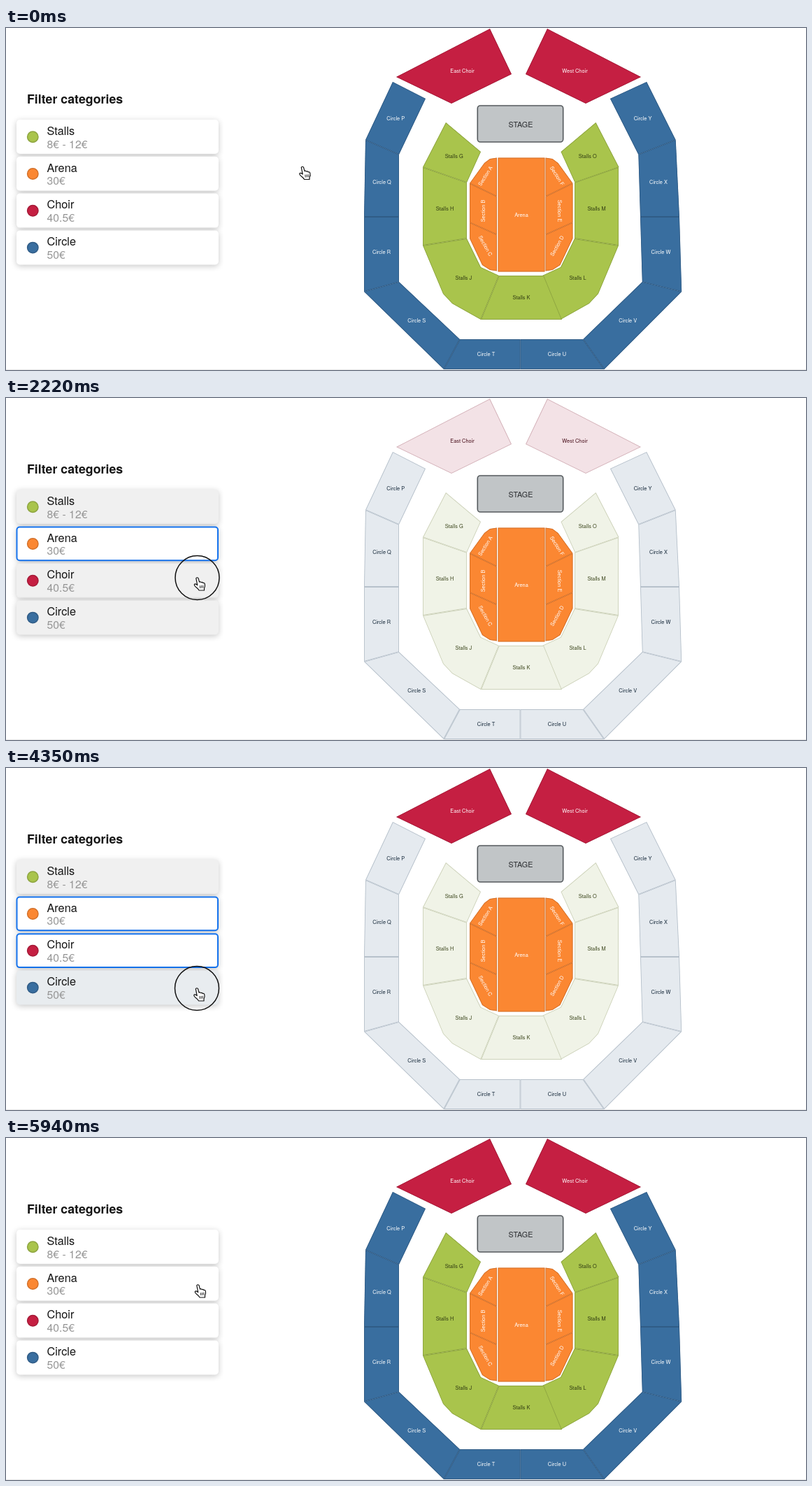
Recreate the animation shown at these times as an HTML page with a canvas. Size 1144 by 489 pixels, loop 7 s.

```html
<!DOCTYPE html>
<html lang="en">
<head>
<meta charset="utf-8">
<title>Filter categories</title>
<style>
html, body { margin: 0; width: 100%; height: 100%; overflow: hidden; background: #fff; }
canvas { display: block; width: 1144px; height: 489px; }
</style>
</head>
<body>
<canvas id="stage"></canvas>
<script>
const W = 1144, H = 489, LOOP = 7000;
const PRESS = 120, LAG = 60, FADE = 30;
const FONT = '"Helvetica Neue", Helvetica, "Liberation Sans", Arial, sans-serif';
const canvas = document.getElementById('stage');
const ctx = canvas.getContext('2d');
const ratio = window.devicePixelRatio || 1;
canvas.width = W * ratio;
canvas.height = H * ratio;

const rgb = c => `rgb(${c.map(Math.round)})`;
const toward = (c, grey, p) => rgb(c.map(v => v + (grey - v) * p));

function category(name, price, color, text) {
  return {
    name, price,
    normal: { fill: rgb(color), line: toward(color, 0, 0.16), text },
    dim: { fill: toward(color, 248, 0.9), line: toward(color, 214, 0.8), text: toward(color, 0, 0.65) }
  };
}
const cats = [
  category('Stalls', '8€ - 12€', [169, 196, 76], '#2f3a12'),
  category('Arena', '30€', [251, 135, 50], '#fff'),
  category('Choir', '40.5€', [197, 31, 66], '#fff'),
  category('Circle', '50€', [57, 110, 159], '#fff')
];
const [stalls, arena, choir, circle] = cats;

// Pointer trips; each press switches its category on or off
const home = { x: 424, y: 198.5 };
const trips = [
  { from: 90, to: 990, x: 273.5, y: 207, press: 1260, cat: arena },
  { from: 1500, to: 2100, x: 273.5, y: 257, press: 2190, cat: choir },
  { from: 2500, to: 2920, x: 273, y: 315, press: 3000, cat: circle },
  { from: 2920, to: 4200, x: 273, y: 315, press: 4260, cat: circle },
  { from: 4560, to: 4700, x: 274, y: 262, press: 4710, cat: choir },
  { from: 4830, to: 5000, x: 275, y: 228, press: 5000, cat: arena },
  { from: 5160, to: 5520, x: 274.5, y: 210 }
];

const blocks = [];
const mean = (points, k) => points.reduce((sum, p) => sum + p[k], 0) / points.length;

// A label sits at the mean of its corners unless told otherwise
function add(cat, label, points, at = [mean(points, 0), mean(points, 1)], turn = 0) {
  const path = new Path2D();
  points.forEach(([x, y]) => path.lineTo(x, y));
  path.closePath();
  blocks.push({ cat, label, at, path, turn });
}

// sum: left x plus right x; tilt: how that sum grows downwards
const flip = (sum, tilt = 0) => ([x, y]) => [sum - x + tilt * (y - 270), y];

function addPair(cat, labels, points, sum, at, turn = 0) {
  const mirror = flip(sum);
  add(cat, labels[0], points, at, turn);
  add(cat, labels[1], points.map(mirror), at && mirror(at), -turn);
}

// Outer ring: left halves mirrored, then cut along the spokes
const wrap = (half, middle, sum) => [...half, middle, ...half.map(flip(sum, 0.03)).reverse()];
const outer = wrap([[553, 77], [514, 160], [512, 270], [512, 377], [626, 488]], [735.5, 488], 1475);
const inner = wrap([[600, 101], [562, 181], [562, 270], [562, 363], [649, 445]], [735.5, 445], 1469);
[...'PQRSTUVWXY'].forEach((letter, i) =>
  add(circle, 'Circle ' + letter, [outer[i], outer[i + 1], inner[i + 1], inner[i]]));

addPair(stalls, ['Stalls G', 'Stalls O'], [[629, 135], [679, 177], [659, 221], [596, 199]], 1472.5);
addPair(stalls, ['Stalls H', 'Stalls M'], [[596, 199], [659, 221], [659, 301], [596, 311]], 1472);
addPair(stalls, ['Stalls J', 'Stalls L'], [[596, 311], [659, 301], [679, 342], [705, 354],
  [679, 417], [638, 394], [625, 380]], 1472);
add(stalls, 'Stalls K', [[679, 417], [705, 354], [769, 354], [795, 417]]);

addPair(choir, ['East Choir', 'West Choir'], [[692, 1], [723, 66], [637, 108], [558, 70]], 1466);

add(arena, 'Arena', [[703.5, 185.5], [770.5, 185.5], [770.5, 348.5], [703.5, 348.5]]);
const wings = [
  [[663, 222], [684, 193], [692, 187], [702, 185.5], [702, 241]],
  [[663, 222], [702, 241], [702, 295.5], [663, 278]],
  [[663, 278], [702, 295.5], [702, 347.5], [692, 346], [681, 339], [663, 301]]
];
wings.forEach((wing, i) => addPair(arena, ['Section ' + 'ABC'[i], 'Section ' + 'FED'[i]], wing, 1473.5,
  [i === 1 ? 682 : 685.5, 211.5 + i * 50], [-58, -90, 61][i]));

const hand = new Path2D('M-1.7 .8Q-.2-1.2 1.5.6L3 6.2Q4.6 5 5.6 6.7Q7.2 5.8 8.2 7.5' +
  'Q10.2 6.7 10.8 8.9Q11.6 12 10 15.3L10 18L2.6 18Q1.2 15.4-2.3 12.9Q-5.2 10.2-3.7 9.1' +
  'Q-2 8.3.2 10.6Z');
const creases = new Path2D('M3.8 11.2L4.3 15M6 11L6.4 14.8M8.2 10.8L8.4 14.6');

const picked = (cat, t) =>
  trips.filter(s => s.cat === cat && s.press + LAG <= t).length % 2 === 1;
const filtering = t => cats.some(c => picked(c, t));

// Mean of recent states gives a short cross-fade
function dimLevel(cat, t) {
  let sum = 0;
  for (let i = 0; i < 4; i++) {
    const past = t - i * FADE / 4;
    sum += filtering(past) && !picked(cat, past);
  }
  return sum / 4;
}

function fingertip(t) {
  let { x, y } = home;
  for (const trip of trips) {
    const p = Math.min(1, Math.max(0, (t - trip.from) / (trip.to - trip.from)));
    const e = p * p * (3 - 2 * p);
    x += (trip.x - x) * e;
    y += (trip.y - y) * e;
  }
  return { x, y };
}

function write(text, x, y, size, color, align = 'left', weight = 400) {
  ctx.font = `${weight} ${size}px ${FONT}`;
  ctx.textAlign = align;
  ctx.fillStyle = color;
  ctx.fillText(text, x, y);
}

function box(x, y, w, h, r) {
  const path = new Path2D();
  path.roundRect(x, y, w, h, r);
  return path;
}

function disc(x, y, r) {
  const path = new Path2D();
  path.arc(x, y, r, 0, 7);
  return path;
}

function paint(path, fill, line, width) {
  if (fill) {
    ctx.fillStyle = fill;
    ctx.fill(path);
  }
  if (line) {
    ctx.strokeStyle = line;
    ctx.lineWidth = width;
    ctx.stroke(path);
  }
}

function drawBlock({ label, at, path, turn }, look, alpha) {
  if (!alpha) return;
  ctx.save();
  ctx.globalAlpha = alpha;
  ctx.save();
  ctx.clip(path);
  paint(path, look.fill, look.line, 1.8);
  ctx.restore();
  ctx.translate(...at);
  ctx.rotate(turn * Math.PI / 180);
  write(label, 0, 2.6, 7.4, look.text, 'center');
  ctx.restore();
}

function cardColor(cat, t, y) {
  const tip = fingertip(t);
  const hovered = tip.x < 304 && tip.y > y && tip.y < y + 49;
  if (picked(cat, t)) return '#fff';
  if (cat === circle && t > 4320 && t < 5400) return '#e8ecef';
  if (filtering(t)) return '#f0f0f0';
  return hovered && t < trips[0].press + LAG ? '#f3f3f2' : '#fff';
}

function drawCards(t) {
  ctx.save();
  ctx.clip(box(7, 122, 304, 226, 0));
  cats.forEach((cat, i) => {
    const y = 131 + i * 52.8;
    ctx.save();
    ctx.shadowColor = 'rgba(0,0,0,.22)';
    ctx.shadowBlur = 9 * ratio;
    ctx.shadowOffsetY = 2 * ratio;
    paint(box(15, y, 289, 49, 5), cardColor(cat, t, y));
    ctx.restore();
    if (picked(cat, t)) paint(box(15.5, y + 0.7, 287.5, 47.8, 4), null, '#1472ed', 2);
    paint(disc(38.3, y + 24.7, 7.7), cat.normal.fill, cat.normal.line, 1.5);
    write(cat.name, 58.5, y + 21.7, 16.3, '#151515');
    write(cat.price, 58.5, y + 40.6, 15.8, '#979797');
  });
  ctx.restore();
}

function drawPointer(t) {
  const { x, y } = fingertip(t);
  ctx.save();
  ctx.translate(x, y);
  if (trips.some(s => t >= s.press && t < s.press + PRESS)) paint(disc(0, 0, 31.5), null, '#111', 1.5);
  paint(hand, '#fff', '#111', 1.2);
  paint(creases, null, '#111', 0.9);
  ctx.restore();
}

function draw(t) {
  ctx.setTransform(ratio, 0, 0, ratio, 0, 0);
  ctx.lineJoin = 'round';
  paint(box(0, 0, W, H, 0), '#fff');
  paint(box(0, 488, W, 1, 0), '#e9e9e9');

  write('Filter categories', 30, 107.8, 17.8, '#151515', 'left', 600);
  drawCards(t);

  for (const cat of cats) {
    const level = dimLevel(cat, t);
    for (const block of blocks.filter(b => b.cat === cat)) {
      drawBlock(block, cat.dim, level ? 1 : 0);
      drawBlock(block, cat.normal, 1 - level);
    }
  }

  paint(box(674.3, 111, 122.4, 52, 4), '#c1c5c7', '#555a5e', 1.6);
  write('STAGE', 736, 141.6, 10.8, '#2b2d30', 'center');

  drawPointer(t);
}

function tick() {
  draw(performance.now() % LOOP);
  requestAnimationFrame(tick);
}
tick();
</script>
</body>
</html>
```
